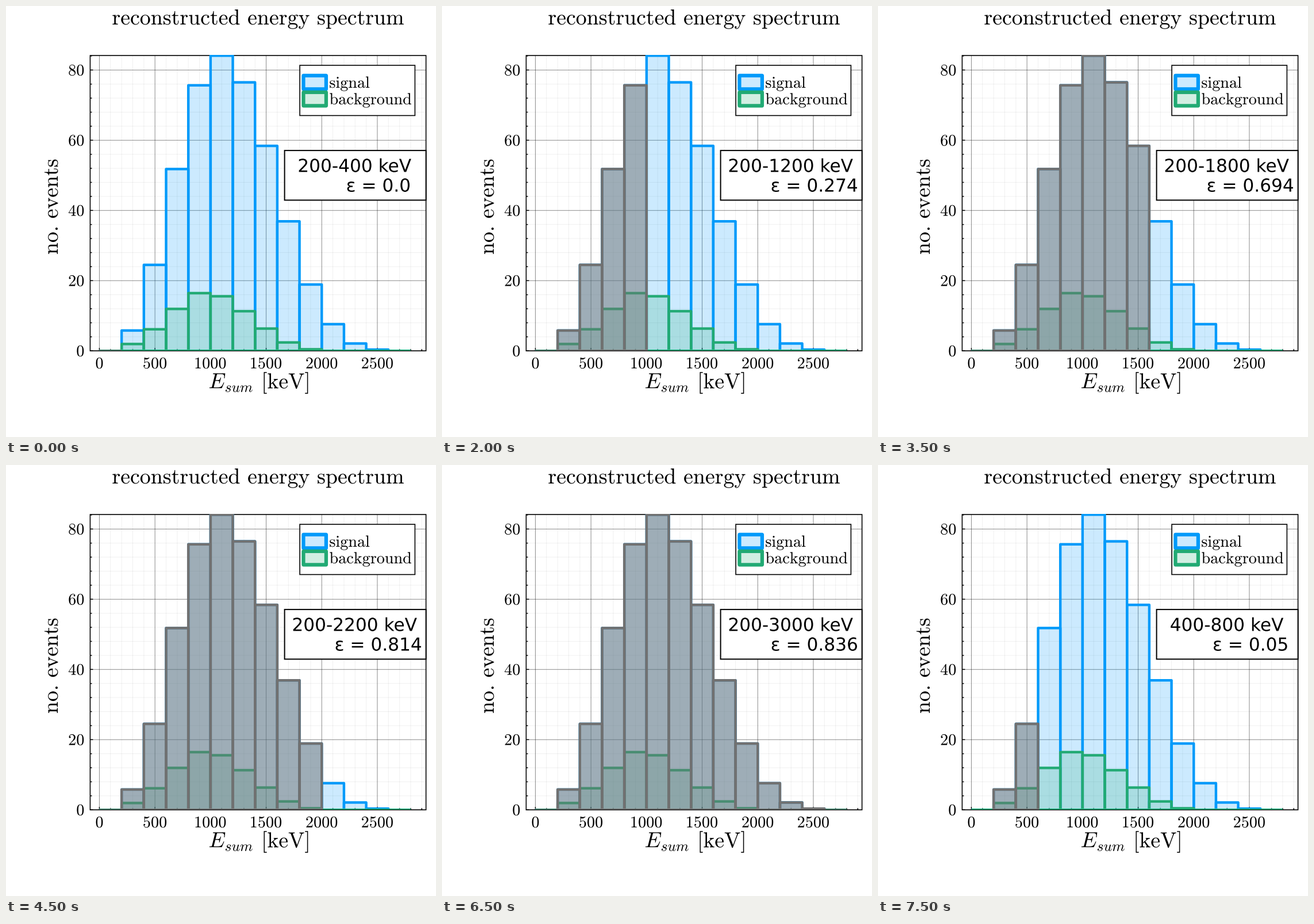
A matplotlib script for the animation above (8000 ms loop, 748 by 749 pixels).

```python
import numpy as np
import matplotlib.pyplot as plt
from matplotlib.animation import FuncAnimation
from matplotlib.colors import to_rgba
from matplotlib.patches import PathPatch, Rectangle
from matplotlib.path import Path
from matplotlib.textpath import TextPath

W, H, DPI = 748, 749, 64
PT = 72 / DPI                                   # points per pixel
SHIFT = 0.4                                     # puts coordinates near pixel centres
LEFT, RIGHT, TOP, BOTTOM = 146, 730.2, 85.6, 598.9
BLUE, GREEN, GRAY = "#009afa", "#22aa74", "#717171"
TITLE, BIG, SMALL, NOTE = 37.85, 37.7, 28.2, 31.2   # em sizes in pixels

SIGNAL = [0, 5.8, 24.5, 51.8, 75.65, 84.1, 76.5, 58.4, 36.9, 18.9, 7.6, 2.1, 0.35, 0]
BACKGROUND = [0, 1.95, 6.15, 11.95, 16.45, 15.55, 11.3, 6.35, 2.4, 0.45, 0, 0, 0, 0]
EFFICIENCY = [0.0, 0.00863, 0.05, 0.14, 0.274, 0.429, 0.576,
              0.694, 0.772, 0.814, 0.831, 0.835, 0.836, 0.836]
BINS = len(SIGNAL)

plt.rcParams.update({"mathtext.fontset": "cm", "path.snap": False})
fig = plt.figure(figsize=(W / DPI, H / DPI), dpi=DPI, facecolor="white")
ax = fig.add_axes([0, 0, 1, 1])
ax.set(xlim=(-SHIFT, W - SHIFT), ylim=(H - SHIFT, -SHIFT))
ax.axis("off")


def px(energy):
    return 162.05 + 0.1934 * energy


def py(count):
    return 598.9 - 6.1 * count


def text_path(s, size, x, y, align="center", upright=False):
    """Outline of s on a baseline, aligned by its ink."""
    p = TextPath((0, 0), s, size=size, prop={"family": "DejaVu Sans"})
    box = p.get_extents()
    shift = {"left": box.x0, "center": (box.x0 + box.x1) / 2, "right": box.x1}[align]
    u, v = p.vertices[:, 0] - shift, p.vertices[:, 1]
    pts = (x - v, y - u) if upright else (x + u, y - v)
    return Path(np.column_stack(pts), p.codes)


def write(*args, **kw):
    patch = PathPatch(text_path(*args, **kw), fc="black", lw=0, zorder=9)
    return ax.add_patch(patch)


def roman(s):
    return r"$\mathrm{" + s.replace(" ", r"\hspace{0.38}") + "}$"


def line(x0, y0, x1, y1, width, alpha=1.0, z=1):
    ax.plot([x0, x1], [y0, y1], color="black", lw=width * PT, alpha=alpha,
            zorder=z, solid_capstyle="butt")


def box(x0, y0, x1, y1, width, edge="black", fill="white", z=6):
    return ax.add_patch(Rectangle((x0, y0), x1 - x0, y1 - y0, fc=fill, ec=edge,
                                  lw=width * PT, zorder=z))


clip = Rectangle((LEFT, 85 - SHIFT), RIGHT - LEFT, 599 - 85, transform=ax.transData)


def histogram(counts, color, alpha, z):
    bars = []
    for i, n in enumerate(counts):
        bar = box(px(200 * i), py(n), px(200 * i + 200), py(0), 4.4,
                  color, to_rgba(color, alpha), z)
        bar.set_joinstyle("round")
        bar.set_clip_path(clip)
        bars.append(bar)
    return bars


# grid, ticks and frame
for e in range(0, 3000, 100):
    major = e % 500 == 0
    line(px(e), TOP, px(e), BOTTOM, 1, 0.45 if major else 0.06)
    line(px(e), BOTTOM, px(e), BOTTOM - (5 if major else 3), 1.5, z=2)
for c in range(0, 85, 4):
    major = c % 20 == 0
    line(LEFT, py(c), RIGHT, py(c), 1, 0.45 if major else 0.06)
    line(LEFT, py(c), LEFT + (5 if major else 3), py(c), 1.5, z=2)
box(LEFT, TOP, RIGHT, BOTTOM, 1.6, fill="none", z=2)

# labels
write(roman("reconstructed energy spectrum"), TITLE, 438.2, 32)
write(r"$\mathrm{no.\hspace{0.18}events}$", BIG, 89.8, 348.5, upright=True)
write("$E$", BIG, 353.5, 664, "left")
write("$sum$", 25.4, 381.5, 670.4, "left")
write(roman("[keV]"), BIG, 486.5, 664)
for e in range(0, 2501, 500):
    write(roman(str(e)), SMALL, px(e), 629.4)
for c in range(0, 81, 20):
    write(roman(str(c)), SMALL, 134.8, py(c) + 9.4, "right")

# data
histogram(SIGNAL, BLUE, 0.2, 3)
histogram(BACKGROUND, GREEN, 0.2, 4)
shade = histogram(SIGNAL, GRAY, 0.5, 5)
for bar, n in zip(shade, SIGNAL):
    if n == 0:
        bar.set_edgecolor(to_rgba(GRAY, 0.6))

# legend
box(510.7, 102.7, 711, 190, 1.6)
for name, color, top, base in (("signal", BLUE, 120.5, 141.8),
                               ("background", GREEN, 149.5, 170.6)):
    swatch = box(517, top, 556.5, top + 23.5, 6.3, color, to_rgba(color, 0.2), 7)
    swatch.set_joinstyle("round")
    write(roman(name), SMALL, 562.8, base, "left")

# readout
box(484.2, 250.7, RIGHT, 337, 2)
span_text = write("200", NOTE, 606.8, 288)
eff_text = write("0", NOTE, 647.4, 322.2)


def update(i):
    second = i >= BINS
    last = i - BINS + 1 if second else i
    for k, bar in enumerate(shade):
        bar.set_visible(second <= k <= last)
    low = 400 if second else 200
    span_text.set_path(text_path(f"{low}-{400 + 200 * last} keV", NOTE, 606.8, 288))
    eff_text.set_path(text_path(f"ε = {EFFICIENCY[last]}", NOTE, 647.4, 322.2))
    return [*shade, span_text, eff_text]


anim = FuncAnimation(fig, update, frames=16, interval=500, repeat=True,
                     repeat_delay=0, blit=False)
plt.show()
```
